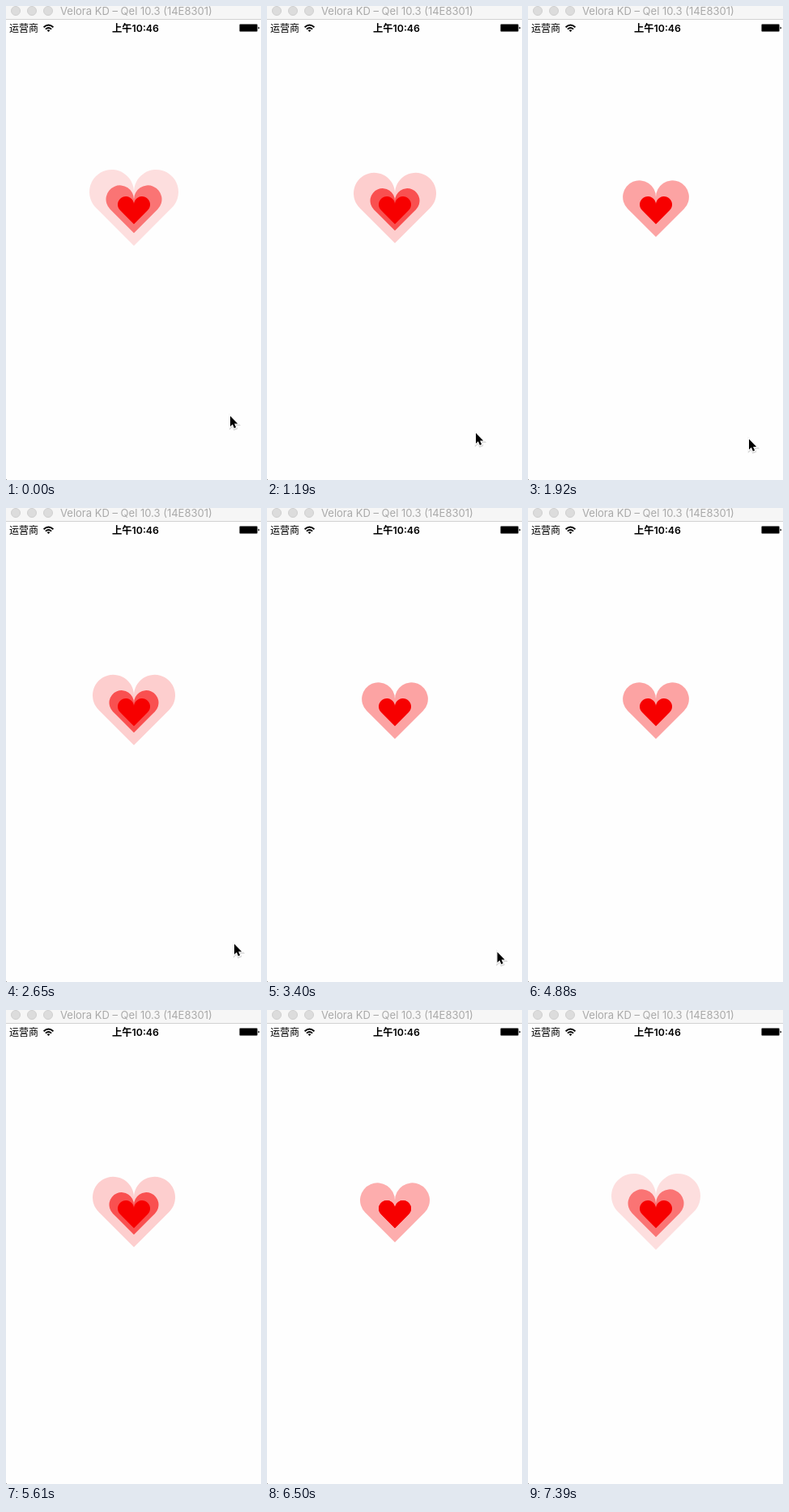
Write an HTML page that moves like this. It is 315 px wide and 585 px high and loops after 9.46 s.

```html
<!DOCTYPE html>
<html lang="zh">
<head>
<meta charset="utf-8">
<title>Heart pulse</title>
<style>
  html, body { margin: 0; height: 100%; overflow: hidden; background: #fefefe; }
  svg { display: block; width: 315px; height: 585px; }
  text { font-family: Inter, "Noto Sans CJK SC", "Noto Sans CJK", sans-serif; }
</style>
</head>
<body>
<svg viewBox="0 0 315 585">
  <defs>
    <path id="heart" d="M0 15.28L-17.07-1.79A10 10 0 1 1 0-8.86A10 10 0 1 1 17.07-1.79Z"/>
    <path id="arrow" d="M0 0V13L2.9 10.2L4.9 15L7.1 14.1L5.1 9.4H9.2Z"/>
  </defs>

  <!-- window title bar -->
  <rect width="315" height="16" fill="#f6f6f6"/>
  <rect y="16" width="315" height="1" fill="#d1d1d1"/>
  <g fill="#dcdcdc" stroke="#d0d0d0">
    <circle cx="12" cy="6" r="5.5"/>
    <circle cx="32" cy="6" r="5.5"/>
    <circle cx="52" cy="6" r="5.5"/>
  </g>
  <text x="67" y="11" font-size="13" fill="#a9a9a9">Velora KD – Qel 10.3 (14E8301)</text>

  <!-- status bar -->
  <text x="4" y="32" font-size="12">运营商</text>
  <g fill="none" stroke="#000" stroke-width="1.9">
    <path d="M46.6 26.2Q52.5 20.8 58.4 26.2"/>
    <path d="M48.9 28.6Q52.5 25.4 56.1 28.6"/>
  </g>
  <path d="M50.6 29.9Q52.5 28.4 54.4 29.9L52.5 31.9Z"/>
  <text x="131" y="31.5" font-size="12.3" font-weight="600">上午10:46</text>
  <rect x="288.5" y="22.5" width="22" height="9" rx="1.2" stroke="#777"/>
  <path d="M311.5 25.5Q313 26 313 27Q313 28 311.5 28.5Z"/>
  <rect y="584" width="1" height="1" fill="#999"/>

  <g transform="translate(158 253.86)" fill="#f70000">
    <use class="pulse" href="#heart"/>
    <use class="pulse" href="#heart"/>
    <use class="pulse" href="#heart"/>
    <use href="#heart"/>
  </g>

  <g id="cursor">
    <use href="#arrow" x=".3" y="1" stroke="#000" stroke-width="3" opacity=".15"/>
    <use href="#arrow" stroke="#fff" stroke-width="2" paint-order="stroke"/>
  </g>
</svg>
<script>
const LOOP = 9460, STEP = 147.8, LAST_STEP = 50, BEAT = 10;

// [step, half width, opacity]
const PULSE = [[4, 20, 1], [8, 30.5, .61], [10, 34.5, .48], [14, 43, .32],
               [18, 51, .19], [20, 55, .125], [21, 59, .06]];
// [step, x, y]
const CURSOR = [[0, 277, 506], [8, 258, 527], [16, 282, 539], [18, 282, 538],
                [24, 285, 550], [28, 256, 581], [30, 250, 592]];

const pulses = document.querySelectorAll(".pulse");
const cursor = document.getElementById("cursor");

// Interpolates the keys linearly; null outside their range.
function sample(keys, step) {
  const next = keys.findIndex(key => key[0] >= step);
  if (next < 0 || step < keys[0][0]) return null;
  const b = keys[next], a = keys[Math.max(0, next - 1)];
  const mix = a === b ? 0 : (step - a[0]) / (b[0] - a[0]);
  return a.slice(1).map((value, i) => value + (b[i + 1] - value) * mix);
}

function show(element, visible) {
  element.setAttribute("visibility", visible ? "visible" : "hidden");
}

function draw(time) {
  const step = Math.min(LAST_STEP, Math.floor((time % LOOP + 14) / STEP));

  // Oldest heart first, so younger ones lie on top.
  pulses.forEach((heart, i) => {
    const age = step % BEAT + BEAT * (pulses.length - 1 - i);
    const state = sample(PULSE, age);
    show(heart, state);
    if (!state) return;
    heart.setAttribute("transform", `scale(${state[0] / 20})`);
    heart.setAttribute("opacity", state[1]);
  });

  const tip = sample(CURSOR, step);
  show(cursor, tip);
  if (tip) cursor.setAttribute("transform", `translate(${tip})`);
}

let start;
function tick(now) {
  start ??= now;
  draw(now - start);
  requestAnimationFrame(tick);
}
draw(0);
requestAnimationFrame(tick);
</script>
</body>
</html>
```
